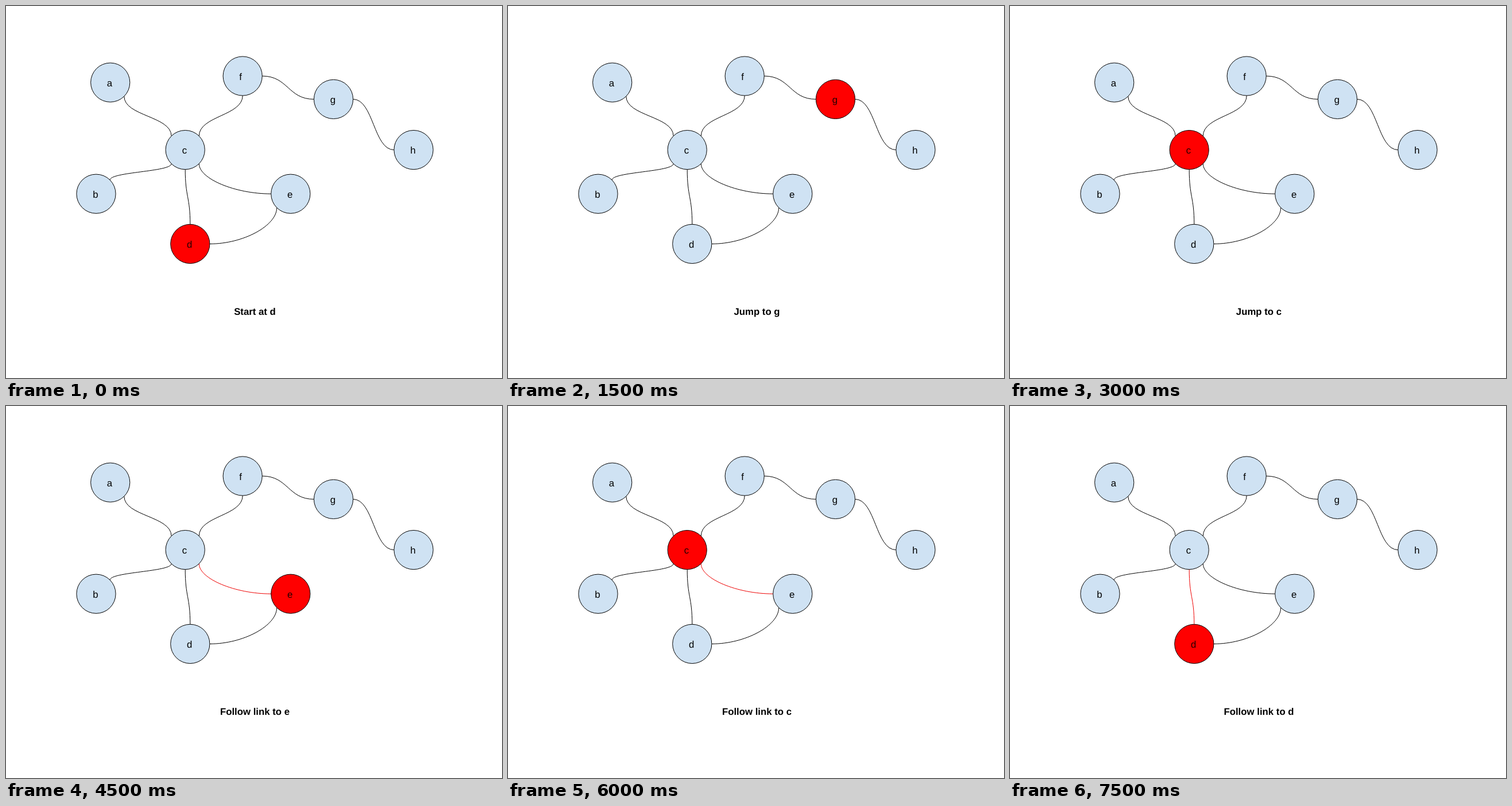
Recreate the animation shown at these times as an HTML page. Size 864 px wide and 648 px high, loop 8 s.

```html
<!DOCTYPE html>
<html lang="en">
<head>
<meta charset="utf-8">
<title>Graph walk</title>
<style>
html, body { margin: 0; width: 100%; height: 100%; overflow: hidden; background: #fff; }
svg { display: block; width: 864px; height: 648px; }
path { fill: none; stroke: #000; stroke-width: 1; }
path.on { stroke: #e00; }
circle { fill: #cfe2f3; stroke: #000; stroke-width: 1; }
text {
  font: 16.8px "Liberation Sans", Arial, sans-serif;
  text-anchor: middle;
  text-rendering: geometricPrecision;
  white-space: pre;
}
.on circle { fill: #f00; }
.on text { fill: #200; }
#caption { font-weight: bold; }
</style>
</head>
<body>
<svg viewBox="0 0 864 648">
  <g id="edges"></g>
  <g id="nodes"></g>
  <text id="caption" x="433.5" y="538"></text>
</svg>
<script>
const R = 34.1, DIAG = R * Math.SQRT1_2, LOOP = 8000, STEP = 1500;
const nodes = {
  a: [181.7, 133.2], b: [157, 327.2], c: [312.2, 250.6], d: [320.8, 414.4],
  e: [495.8, 327.2], f: [412.2, 122], g: [570.5, 162.4], h: [710, 250.6]
};
const sides = {
  n: [0, -R], s: [0, R], w: [-R, 0], e: [R, 0],
  nw: [-DIAG, -DIAG], ne: [DIAG, -DIAG], sw: [-DIAG, DIAG], se: [DIAG, DIAG]
};
const steps = [
  { node: 'd', text: 'Start at d' },
  { node: 'g', text: 'Jump to g' },
  { node: 'c', text: 'Jump to c' },
  { node: 'e', edge: 'ce', text: 'Follow link to e' },
  { node: 'c', edge: 'ce', text: 'Follow link to c' },
  { node: 'd', edge: 'cd', text: 'Follow link to d' }
];

function add(parent, tag, attrs) {
  const el = document.createElementNS('http://www.w3.org/2000/svg', tag);
  for (const key in attrs) el.setAttribute(key, attrs[key]);
  return parent.appendChild(el);
}

const port = (name, side) => nodes[name].map((v, i) => v + sides[side][i]);

// Each curve takes the two end points and returns path data.
const curves = {
  vertical([x, y], [X, Y]) {
    const mid = (y + Y) / 2;
    return `M${x} ${y}C${x} ${mid} ${X} ${mid} ${X} ${Y}`;
  },
  horizontal([x, y], [X, Y]) {
    const mid = (x + X) / 2;
    return `M${x} ${y}C${mid} ${y} ${mid} ${Y} ${X} ${Y}`;
  },
  bend([x, y], [X, Y]) {
    return `M${x} ${y}C${x} ${(y + Y) / 2} ${(x + X) / 2} ${Y} ${X} ${Y}`;
  }
};

const edgeEls = {}, nodeEls = {};
const edgeLayer = document.getElementById('edges');
const nodeLayer = document.getElementById('nodes');
const caption = document.getElementById('caption');

for (const [from, out, to, into, curve] of [
  ['a', 'se', 'c', 'nw', 'vertical'],
  ['c', 'sw', 'b', 'ne', 'vertical'],
  ['c', 's', 'd', 'n', 'vertical'],
  ['f', 's', 'c', 'ne', 'vertical'],
  ['f', 'e', 'g', 'w', 'horizontal'],
  ['g', 'e', 'h', 'w', 'horizontal'],
  ['c', 'se', 'e', 'w', 'bend'],
  ['e', 'sw', 'd', 'e', 'bend']
]) {
  edgeEls[from + to] = add(edgeLayer, 'path', { d: curves[curve](port(from, out), port(to, into)) });
}

for (const name in nodes) {
  const [x, y] = nodes[name];
  const group = nodeEls[name] = add(nodeLayer, 'g', {});
  add(group, 'circle', { cx: x, cy: y, r: R });
  // The label of f is set with a trailing space, which moves it left.
  add(group, 'text', { x: x - 1.2, y: y + 6.6 }).textContent = name === 'f' ? 'f ' : name;
}

function mark(els, active) {
  for (const key in els) els[key].classList.toggle('on', key === active);
}

let shown = -1;
function show(index) {
  if (index === shown) return;
  shown = index;
  const step = steps[index];
  mark(nodeEls, step.node);
  mark(edgeEls, step.edge);
  caption.textContent = step.text;
}

const start = performance.now();
function tick() {
  show(Math.floor((performance.now() - start) % LOOP / STEP));
  requestAnimationFrame(tick);
}
tick();
</script>
</body>
</html>
```
